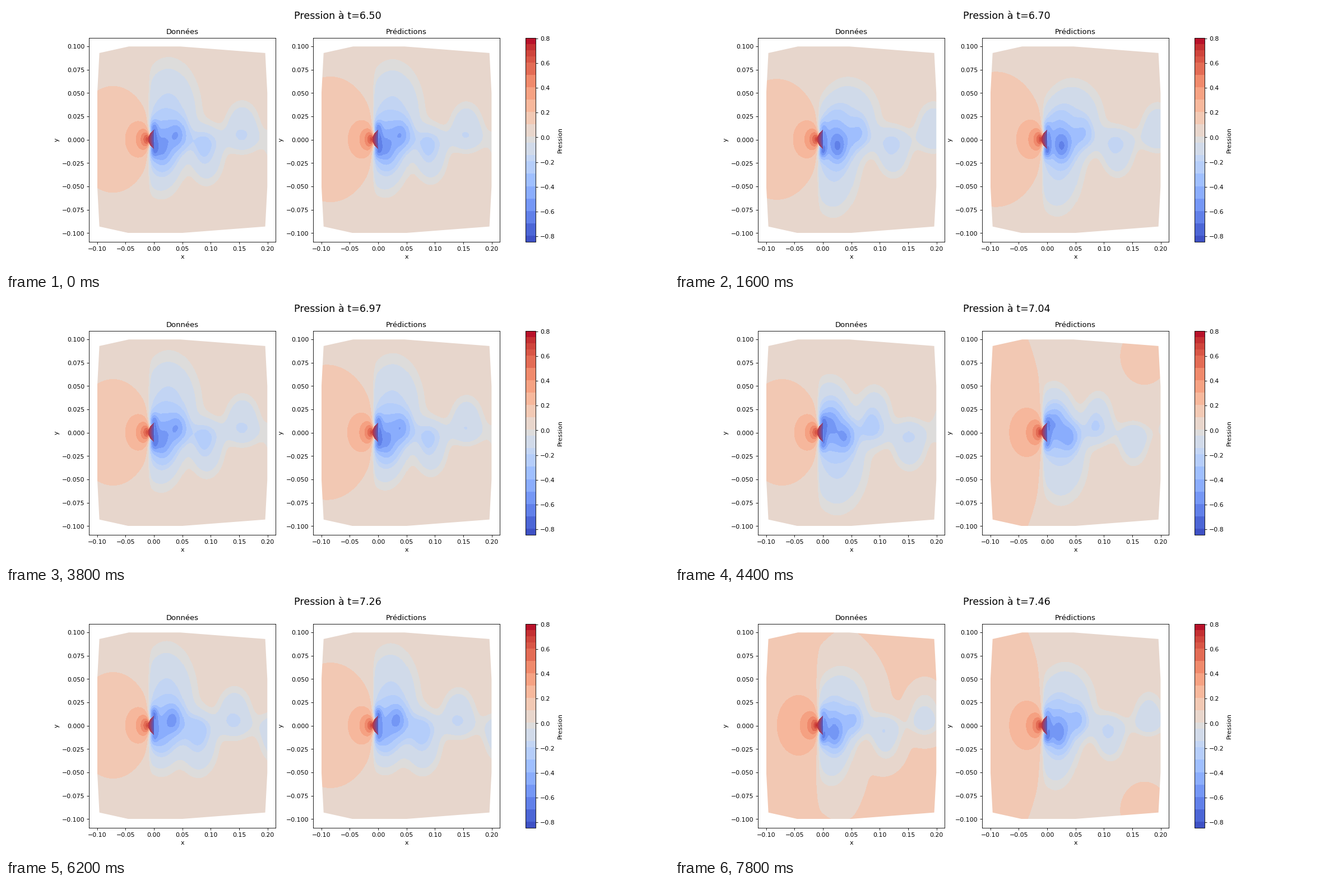
Write a matplotlib script that moves like this. It is 1183 px wide and 473 px high and loops after 8 s.

```python
import matplotlib.pyplot as plt
import numpy as np
from matplotlib.animation import FuncAnimation
from matplotlib.cm import ScalarMappable
from matplotlib.colors import BoundaryNorm, ListedColormap
from matplotlib.patches import Polygon

FRAMES, INTERVAL = 40, 200
T0, DT = 6.504, 0.0245
HALF_PERIOD = 0.0775
LOW, HIGH = -0.845, 0.805

# Pressure bands: wide in the middle, fine at the ends
edges = np.r_[LOW, np.arange(-0.795, -0.19, 0.1), -0.145, -0.045,
              np.arange(0.005, 0.6, 0.1), np.linspace(0.605, HIGH, 5)]
mids = (edges[:-1] + edges[1:]) / 2
colors = plt.get_cmap("coolwarm")((mids - LOW) / (HIGH - LOW))[:, :3]

# Ambient pressure: a level plus short surges around some frames
DATA = dict(level=0.052, height=0.06, surges=(5, 39))
PREDICTION = dict(level=0.06, height=0.031, surges=(5, 22, 39))

# Upper half of the flow domain; the lower half mirrors it
TOP = [(-0.0997, 0.05), (-0.096, 0.093), (-0.044, 0.1),
       (0.046, 0.1), (0.196, 0.093), (0.1997, 0.05)]
OUTLINE = TOP + [(px, -py) for px, py in reversed(TOP)]

x, y = np.meshgrid(np.linspace(-0.1, 0.2, 304), np.linspace(-0.1, 0.1, 333))


def bump(cx, cy, rx, ry, power=1):
    """Gaussian spot; a higher power flattens its top."""
    return np.exp(-(((x - cx) / rx) ** 2 + ((y - cy) / ry) ** 2) ** power)


def peak(t, center, width):
    return np.exp(-((t - center) / width) ** 2)


def ease(t):
    t = np.clip(t, 0, 1)
    return t * t * (3 - 2 * t)


# Parts of the field that keep their shape
dx = x + 0.005
front = -dx / (0.71 * dx**2 + y**2 + 0.0043**2)
back = -0.5 * dx / (0.71 * dx**2 + y**2 + 0.03**2) * np.exp(-(x / 0.07) ** 2)
dipole = 0.0051 * np.where(dx < 0, front, back)
behind = 1 / (1 + np.exp(-(x + 0.0095) / 0.002))
band = (0.1 - 0.2 * np.clip(x, 0, 0.2)) * np.exp(-(y / 0.014) ** 2)
band /= 1 + np.exp(-(x - 0.04) / 0.008)
still_wake = band + 0.14 * bump(0.015, 0, 0.03, 0.026) + 0.2 * bump(0.002, 0, 0.006, 0.013)
for side in (-1, 1):
    still_wake += 0.12 * bump(-0.002, side * 0.0125, 0.007, 0.007)

# Lens-shaped body, shaded from red to blue
lens_left = -0.0105 * (1 - (y / 0.0105) ** 2)
lens = (x > lens_left) & (x < 0) & (abs(y) < 0.0105)
mix = ((x[lens] - lens_left[lens]) / -lens_left[lens])[:, None]
lens_rgb = ((1 - mix) * np.array([190, 50, 58]) + mix * np.array([75, 95, 205])) / 255


def vortex(age, side):
    """Suction of one shed vortex; its age is counted in half periods."""
    cx = 0.042 + 0.038 * age + 0.008 * age**2
    cy = side * (0.006 + 0.007 * min(abs(age), 1))
    strength = 0.25 * peak(age, -0.4, 0.9) + 0.05 * peak(age, 1, 0.7)
    core = strength * bump(cx, cy, 0.015, 0.015)

    # The lobe hangs on to the body, then lets go and drifts off
    left = -0.03 + ease((age - 0.3) / 0.6) * (cx + 0.005)
    right = cx + 0.034
    youth = peak(age, -0.2, 0.9)
    height = 0.026 + 0.027 * youth
    lobe = (0.15 + 0.04 * youth) * bump((left + right) / 2, side * 0.55 * height,
                                        (right - left) / 2, height, 1.5)
    tip = 0.22 * peak(age, -0.45, 0.55) * bump(-0.002, side * 0.013, 0.008, 0.008)
    return ease((age + 1.6) / 0.6) * (core + lobe) + tip


def pressure(k, flow):
    phase = k * DT / HALF_PERIOD
    suction = still_wake.copy()
    for n in range(int(np.ceil(phase - 3.5)), int(np.floor(phase + 1.6)) + 1):
        suction += vortex(phase - n, 1 if n % 2 == 0 else -1)
    surge = sum(peak(k, center, 2) for center in flow["surges"])
    corner = 0.03 * bump(0.17, 0.2 * np.cos(np.pi * k / 60), 0.05, 0.035)
    ambient = flow["level"] + surge * (flow["height"] + corner)
    return ambient + dipole - behind * suction


def picture(k, flow):
    rgb = colors[np.digitize(pressure(k, flow), edges[1:-1])]
    rgb[lens] = lens_rgb
    return rgb


fig, axes = plt.subplots(1, 2, figsize=(15, 6), dpi=78.87)
title = fig.suptitle("", fontsize=16)
panels = []
for ax, name, flow in zip(axes, ("Données", "Prédictions"), (DATA, PREDICTION)):
    im = ax.imshow(picture(0, flow), extent=(-0.1, 0.2, -0.1, 0.1), origin="lower",
                   aspect="auto", interpolation="nearest")
    im.set_clip_path(Polygon(OUTLINE, transform=ax.transData))
    ax.set(title=name, xlabel="x", ylabel="y",
           xlim=(-0.1145, 0.2145), ylim=(-0.1094, 0.1094))
    ax.set_xticks(np.arange(-2, 5) * 0.05)
    ax.set_yticks(np.arange(-4, 5) * 0.025)
    panels.append((im, flow))

scale = ScalarMappable(BoundaryNorm(edges, len(colors)), ListedColormap(colors))
bar = fig.colorbar(scale, ax=axes, label="Pression", spacing="proportional",
                   ticks=np.round(np.arange(-4, 5) * 0.2, 1))
bar.minorticks_off()


def update(k):
    for im, flow in panels:
        im.set_data(picture(k, flow))
    title.set_text(f"Pression à t={T0 + DT * k:.2f}")
    return [im for im, _ in panels] + [title]


anim = FuncAnimation(fig, update, frames=FRAMES, interval=INTERVAL,
                     repeat=True, repeat_delay=0, blit=False)
plt.show()
```
